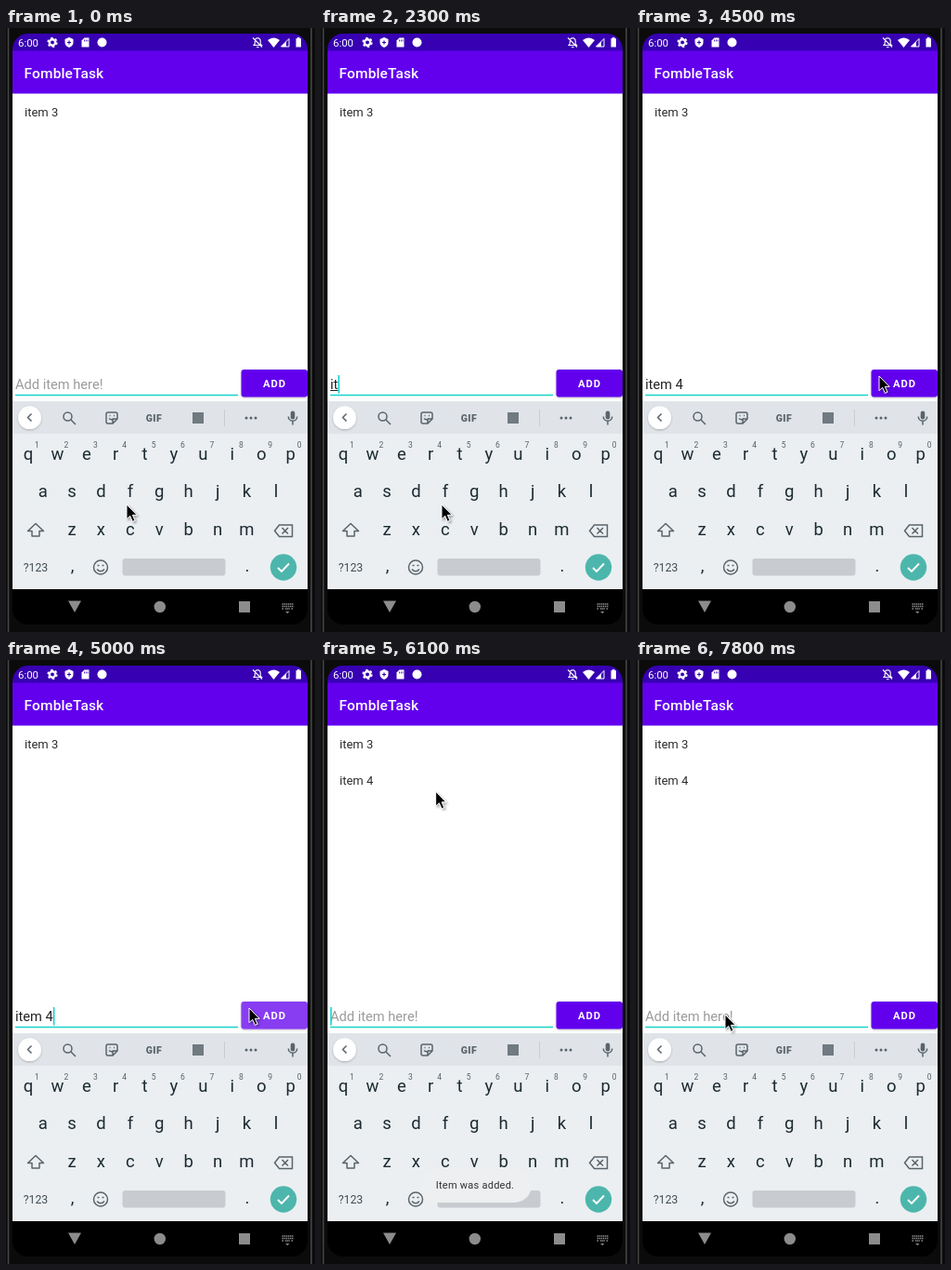
Recreate the animation shown at these times as an HTML page. Size 333x649 px, loop 8 s.

```html
<!DOCTYPE html>
<html lang="en">
<head>
<meta charset="utf-8">
<title>To-do list</title>
<style>
  html, body { margin: 0; width: 100%; height: 100%; overflow: hidden; background: #000; }
  svg { display: block; width: 100vw; height: 100vh; }
  text { font-family: Roboto, sans-serif; white-space: pre; }
  .mid { text-anchor: middle; }
  .key { font-size: 18.5px; fill: #1c2b31; text-anchor: middle; }
  .digit { font-size: 8.5px; fill: #566167; text-anchor: middle; }
  .word { font-size: 14.5px; fill: #636b70; text-anchor: middle; }
  .item { font-size: 13px; fill: #2c2c2c; }
  .line { fill: none; stroke: #59646a; stroke-width: 1.5; }
</style>
</head>
<body>
<svg viewBox="0 0 333 649">
  <defs>
    <clipPath id="screen"><rect x="7" y="6" width="318" height="635" rx="17"/></clipPath>
    <clipPath id="buttonShape"><rect x="253.500" y="367" width="71.500" height="29.500" rx="3"/></clipPath>
    <filter id="shadow" x="-20%" y="-30%" width="140%" height="170%">
      <feDropShadow dx="0" dy="1" stdDeviation=".8" flood-opacity=".25"/>
    </filter>
    <filter id="mouseShadow" x="-20%" y="-20%" width="170%" height="150%">
      <feDropShadow dx="1.500" dy="1.500" stdDeviation=".8" flood-opacity=".35"/>
    </filter>
  </defs>

  <rect width="333" height="649" fill="#0b0b0b"/>
  <path d="M2.500 0V649M329 0V649" stroke="#454545" stroke-width="1.600"/>

  <g clip-path="url(#screen)">
    <rect x="7" y="6" width="318" height="19" fill="#3700b3"/>
    <rect x="7" y="24.5" width="318" height="47" fill="#6200ee"/>
    <rect x="7" y="70.500" width="318" height="331" fill="#fff"/>
    <rect x="7" y="401" width="318" height="36" fill="#e0e4e8"/>
    <rect x="7" y="436" width="318" height="167" fill="#ebeff2"/>
    <rect x="7" y="603" width="318" height="40" fill="#000"/>

    <!-- status bar -->
    <g fill="#fff">
      <text x="13" y="19.7" font-size="11.4">6:00</text>
      <circle cx="50" cy="15.5" r="3.2" fill="none" stroke="#fff" stroke-width="2.4"/>
      <circle cx="50" cy="15.5" r="4.8" fill="none" stroke="#fff" stroke-width="1.6" stroke-dasharray="2.5 2.53"/>
      <path d="M68 10l4.5 2v3.5q0 3.500-4.500 5.500-4.500-2-4.500-5.500V12z"/>
      <path d="M68 13.500v4M66 15.500h4" stroke="#3700b3" stroke-width="1.2"/>
      <path d="M84.500 10.500H89.500V20.500H81.500V13.500z"/>
      <path d="M84.500 12.500v2M86.300 12.500v2M88 12.500v2" stroke="#3700b3" stroke-width=".8"/>
      <circle cx="103.500" cy="15.500" r="5"/>
      <path d="M267 18.500h8.500l-1.300-1.500v-3q0-3-3-3.300-3 .3-3 3.300v3zM266 10.500l10 10M270 20.500h2.500" fill="none" stroke="#fff" stroke-width="1.1"/>
      <path d="M282 13q6.500-5 13 0l-6.500 8z"/>
      <path d="M305 11.500V20H296.500z" fill="none" stroke="#fff"/>
      <path d="M302 14.500V20H296.500z"/>
      <path d="M314 10h2.500v1.200h1.500v9.300h-5.500v-9.300h1.500z"/>
    </g>

    <text x="19.500" y="54" font-size="15.5" font-weight="500" letter-spacing=".15" fill="#fff">FombleTask</text>
    <text class="item" x="20" y="95">item 3</text>
    <text class="item" x="20" y="134" id="added">item 4</text>

    <!-- input row -->
    <path d="M10 394.500H250" stroke="#16d4cb" stroke-width="1.6"/>
    <text id="entry" x="10" y="388" font-size="14.650"></text>
    <path id="underline" stroke="#222" stroke-width="1"/>
    <rect id="caret" y="373" width="1.6" height="19.500" fill="#16d4cb"/>
    <rect x="253.500" y="367" width="71.500" height="29.500" rx="3" fill="#6200ee" filter="url(#shadow)"/>
    <circle id="ripple" cx="264" cy="378" fill="#fff" opacity=".24" clip-path="url(#buttonShape)"/>
    <text class="mid" x="289.500" y="386" font-size="11.2" font-weight="600" letter-spacing=".9" fill="#fff">ADD</text>

    <!-- keyboard strip -->
    <circle cx="25.500" cy="418.700" r="12.400" fill="#fff" filter="url(#shadow)"/>
    <path id="chevron" class="line"/>
    <g id="tools">
      <path class="line" d="M70 421l5 5"/>
      <circle class="line" cx="66.500" cy="417.500" r="4.500"/>
      <path class="line" d="M110 413h8q2 0 2 2v5l-5 5h-5q-2 0-2-2v-8q0-2 2-2zM120 420h-3.500q-1.500 0-1.500 1.500v3.500M111 419.500q2.500 2.500 5 0M111.500 416.500h1M116 416.500h1"/>
      <text class="mid" x="159.500" y="422.500" font-size="10.500" font-weight="900" letter-spacing=".5" fill="#59646a">GIF</text>
      <rect x="201" y="413" width="12" height="12" fill="#707a80"/>
      <path d="M235.500 410V428" stroke="#c9ced2"/>
      <path d="M259 419h.01M264 419h.01M269 419h.01" stroke="#59646a" stroke-width="3" stroke-linecap="round"/>
    </g>
    <g id="words">
      <path d="M119.500 410V428M211.500 410V428" stroke="#c9ced2"/>
      <text class="word" x="77" y="424"></text>
      <text class="word" x="165" y="424"></text>
      <text class="word" x="252" y="424"></text>
    </g>
    <rect x="306.700" y="411.500" width="4.600" height="9" rx="2.300" fill="#59646a"/>
    <path class="line" d="M304.300 417.500a4.700 4.700 0 0 0 9.400 0M309 422.500v4"/>

    <!-- keys -->
    <g id="keys"></g>
    <path class="line" d="M32 532.500l8.500 8h-4.500v5.500h-8v-5.500h-4.500z" stroke-linejoin="round"/>
    <path class="line" d="M294.500 534H308.500V546.500H294.500L289.500 540.200zM297.500 537l6.500 6.500M304 537l-6.500 6.500"/>
    <text class="mid" x="32" y="584" font-size="12.300" fill="#404c52">?123</text>
    <text class="key" x="71.500" y="584">,</text>
    <text class="key" x="260" y="584">.</text>
    <circle class="line" cx="102" cy="579.500" r="7.500"/>
    <path class="line" d="M98 581.500q4 4.500 8 0M98.500 577.500h2M103.500 577.500h2"/>
    <rect x="125.500" y="570" width="111" height="18.500" rx="3" fill="#c8ccd0"/>
    <circle cx="299" cy="579.500" r="14.200" fill="#4db6ac"/>
    <path d="M293 580l4 4 8-8.500" fill="none" stroke="#fff" stroke-width="1.900"/>

    <!-- navigation -->
    <g fill="#8c8c8c">
      <path d="M67 615.500H81L74 628z"/>
      <circle cx="165.800" cy="622" r="6.200"/>
      <rect x="251" y="616" width="12" height="12"/>
      <path d="M301 627h4.500l-2.200 2z"/>
    </g>
    <path d="M297.500 619h12M297.500 621.500h12M297.500 624h2M301 624h5M307.500 624h2" stroke="#8c8c8c" stroke-width="1.400" stroke-dasharray="1.500 .6"/>

    <g id="toast">
      <rect x="107" y="546" width="120" height="37" rx="18.500" fill="#edeff0"/>
      <text class="mid" x="166" y="568" font-size="11" letter-spacing=".25" fill="#303030">Item was added.</text>
    </g>
  </g>

  <path id="mouse" d="M0 0V14.500L3.400 11.400 5.900 17 8.300 15.900 5.900 10.500H10.300Z" fill="#000" stroke="#fff" stroke-width=".9" filter="url(#mouseShadow)"/>
</svg>
<script>
const $ = id => document.getElementById(id);
const LOOP = 8000;

const label = (cls, x, y, s) => `<text class="${cls}" x="${x}" y="${y}">${s}</text>`;
const row = (letters, x, y) => [...letters].map((c, i) => label("key", x + 31.4 * i, y, c)).join("");
$("keys").innerHTML = row("qwertyuiop", 24, 464) + row("asdfghjkl", 39.700, 504) + row("zxcvbnm", 71, 545) +
  [..."1234567890"].map((d, i) => label("digit", 33.500 + 31.4 * i, 451, d)).join("");

// Each step: start time, then value
const typed = [[0, ""], [2300, "it"], [2900, "item"], [3400, "item "], [3700, "item 4"], [5300, ""]];
const guesses = [[0, ""], [2900, "items,item,itemized"], [3400, "I,is,and"], [3800, ""]];
const rippleSize = [[0, 0], [4700, 16], [4800, 38], [5000, 70], [5300, 0]];
const blinks = [500, 1100, 1600, 4200, 4700, 5800, 6000, 6600, 7000, 7500];
const mousePath = [
  [3900, 130, 512], [4100, 165, 455], [4200, 210, 385], [4300, 243, 335], [4400, 256, 324],
  [4500, 262, 374], [5300, 262, 374], [5400, 256, 362], [5600, 185, 225], [5800, 143, 142],
  [6000, 138, 136], [6300, 95, 152], [6700, 73, 261], [7000, 73, 261], [7600, 96, 381]
];

const stepAt = (steps, t) => steps.findLast(s => s[0] <= t)[1];
const clamp = v => Math.max(0, Math.min(1, v));

function mouseAt(t) {
  const next = mousePath.findIndex(p => p[0] > t);
  if (next === 0) return mousePath[0].slice(1);
  if (next < 0) return mousePath.at(-1).slice(1);
  const a = mousePath[next - 1], b = mousePath[next];
  const k = (t - a[0]) / (b[0] - a[0]);
  return [a[1] + (b[1] - a[1]) * k, a[2] + (b[2] - a[2]) * k];
}

function show(id, on) { $(id).style.display = on ? "" : "none"; }

function draw(t) {
  const value = stepAt(typed, t), entry = $("entry");
  entry.textContent = value || "Add item here!";
  entry.setAttribute("fill", value ? "#222" : "#9b9b9b");
  const end = 10 + (value ? entry.getComputedTextLength() : 0);
  $("caret").setAttribute("x", end);
  show("caret", blinks.filter(b => b <= t).length % 2);
  $("underline").setAttribute("d", `M10 389.500H${end}`);
  show("underline", value === "it" || value === "item");

  const words = stepAt(guesses, t);
  show("tools", !words);
  show("words", words);
  words.split(",").forEach((w, i) => $("words").querySelectorAll("text")[i].textContent = w);
  $("chevron").setAttribute("d", words ? "M23.500 414.500l4 4-4 4" : "M27.500 414.500l-4 4 4 4");

  $("ripple").setAttribute("r", stepAt(rippleSize, t));
  show("added", t >= 5500);
  $("toast").setAttribute("opacity", Math.min(clamp((t - 5300) / 400), clamp((7600 - t) / 300)));
  $("mouse").setAttribute("transform", `translate(${mouseAt(t)}) scale(1.08)`);
}

function tick() {
  draw(Math.floor(performance.now() % LOOP / 100) * 100);
  requestAnimationFrame(tick);
}
tick();
</script>
</body>
</html>
```
